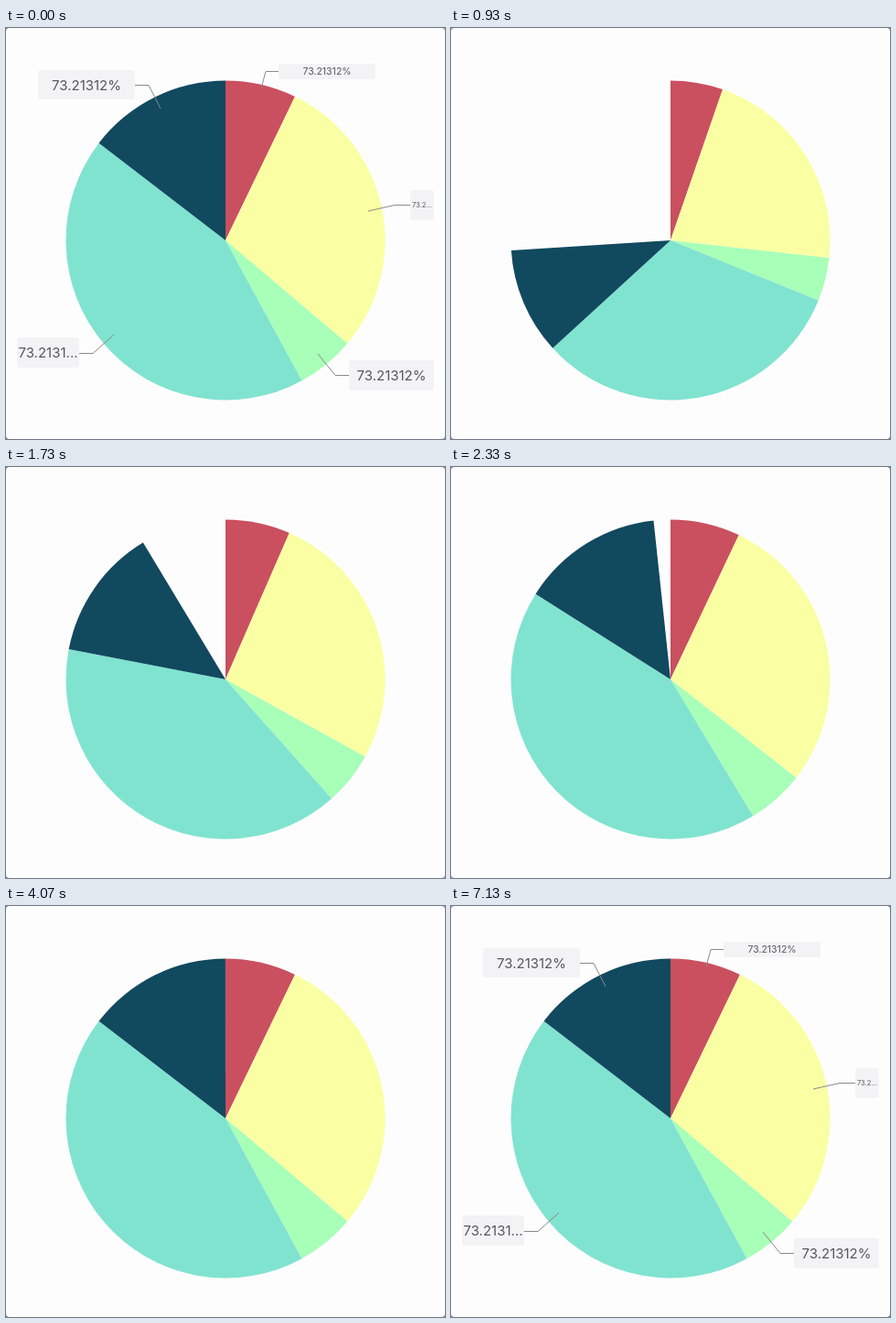
An HTML page that plays this animation: 480 px wide and 449 px high, repeating every 7190 ms.

```html
<!DOCTYPE html>
<html lang="en">
<head>
<meta charset="utf-8">
<title>Pie chart</title>
<style>
  html, body { margin: 0; height: 100%; overflow: hidden; background: #8a8a8c; }
  svg { display: block; width: 480px; height: 449px; }
  text { font-family: Inter, Roboto, sans-serif; fill: #58585a; text-anchor: middle; dominant-baseline: central; }
  polyline { fill: none; stroke: #8a8a8a; }
</style>
</head>
<body>
<svg viewBox="0 0 480 449">
  <rect width="480" height="449" rx="4" fill="#fefdfe"/>
  <g id="pie"></g>
  <g id="labels"></g>
</svg>
<script>
const LOOP = 7190, CX = 240, CY = 232, R = 174.5;
const RESET = 870, GROW = 1085, FADE = 5190, FADE_TIME = 250;
const START_GAP = 93.6, RATE = 0.00355;

// End angle in degrees, clockwise from the top
const slices = [
  [25.8, '#ca505f'], [130.2, '#faffa3'], [151.4, '#a8ffb8'],
  [307.5, '#80e3d0'], [360, '#11495f']
];

// Box x, y, width, height; text; font size; leader line
const labels = [
  [298, 39, 106, 17, '73.21312%', 10.5, '298,47.5 284,47.5 279,66'],
  [442, 177, 26, 33, '73.2...', 7.6, '442,193.5 425,193.5 396,200'],
  [375, 363, 93, 33, '73.21312%', 15, '375,379.5 360,379.5 341,356'],
  [12, 338, 68, 33, '73.2131...', 15, '80,355.5 95,355.5 118,335'],
  [35, 46, 106, 32, '73.21312%', 15, '141,62.5 156,62.5 169,88']
];

const pie = document.getElementById('pie');
const labelGroup = document.getElementById('labels');

pie.innerHTML = slices.map(([, color]) => `<path fill="${color}"/>`).join('');
labelGroup.innerHTML = labels.map(([x, y, w, h, text, size, line]) => `
  <polyline points="${line}"/>
  <rect x="${x}" y="${y}" width="${w}" height="${h}" rx="3" fill="#f3f3f5"/>
  <text x="${x + w / 2}" y="${y + h / 2}" font-size="${size}">${text}</text>`).join('');

function rim(degrees) {
  const a = degrees * Math.PI / 180;
  return `${CX + R * Math.sin(a)} ${CY - R * Math.cos(a)}`;
}

// Critically damped spring closing the gap
function sweepAt(t) {
  if (t < RESET || t >= FADE) return 1;
  const x = Math.max(0, t - GROW) * RATE;
  return 1 - START_GAP * (1 + x) * Math.exp(-x) / 360;
}

function labelOpacity(t) {
  return t < RESET ? 1 : Math.min(1, Math.max(0, (t - FADE) / FADE_TIME));
}

function draw(t) {
  const sweep = sweepAt(t);
  let from = 0;
  slices.forEach(([end], i) => {
    const to = end * sweep;
    const large = to - from > 180 ? 1 : 0;
    pie.children[i].setAttribute('d',
      `M${CX} ${CY}L${rim(from)}A${R} ${R} 0 ${large} 1 ${rim(to)}Z`);
    from = to;
  });
  labelGroup.setAttribute('opacity', labelOpacity(t));
}

const begin = performance.now();
function tick() {
  draw((performance.now() - begin) % LOOP);
  requestAnimationFrame(tick);
}
tick();
</script>
</body>
</html>
```
